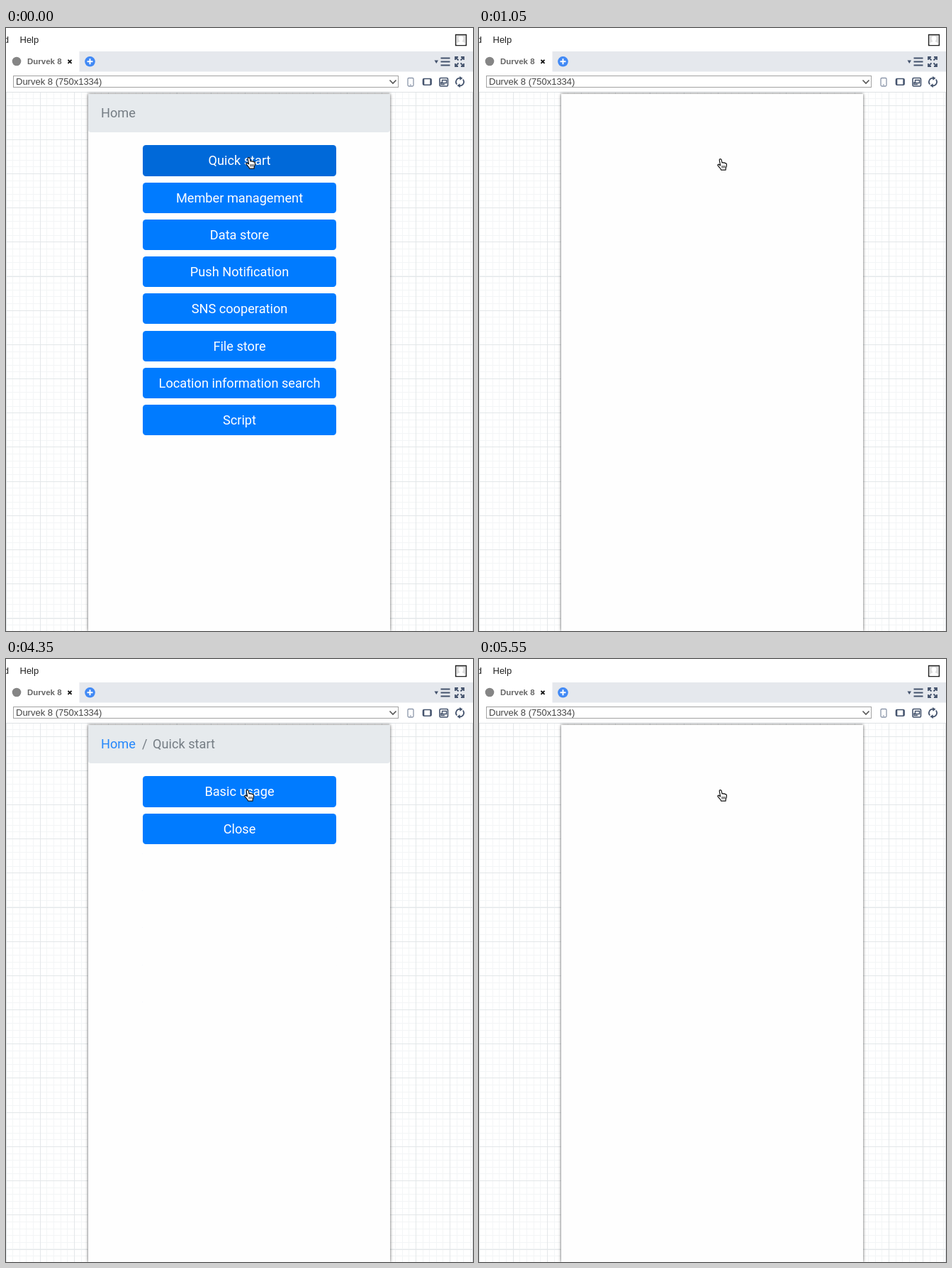
An HTML page that plays this animation: 659x850 px, repeating every 8000 ms.

```html
<!DOCTYPE html>
<html lang="en">
<head>
<meta charset="utf-8">
<title>Preview</title>
<style>
  html, body { margin: 0; width: 100%; height: 100%; overflow: hidden; background: #fff; }
  #stage { position: relative; width: 659px; height: 850px; overflow: hidden; }
  #stage > *, .page > * { position: absolute; }
  .ui { left: 0; top: 0; font: 13px "Liberation Sans", Arial, sans-serif; }

  .phone {
    left: 116px; top: 93px; width: 426px; height: 757px;
    background: #fefefe; box-shadow: 0 0 4px rgba(0, 0, 0, .65);
  }
  .page { left: 0; top: 0; width: 659px; height: 850px; font: 18.2px Roboto, sans-serif; visibility: hidden; }
  .crumbs {
    left: 116px; top: 93px; width: 408px; height: 54px; padding-left: 18px;
    line-height: 54px; border-radius: 0 0 4px 4px;
    background: #e6eaed; color: #757d84; white-space: pre;
  }
  .crumbs b { font-weight: 400; position: absolute; }
  .crumbs .link { color: #2487fb; }
  .btn {
    left: 193px; top: calc(165.4px + var(--row) * 52.22px); width: 273px; height: 43.2px;
    line-height: 43.6px; border-radius: 4.5px; text-align: center;
    background: #007bff; color: #fff;
  }
  .toast {
    left: 330px; top: 93px; width: 212px; height: 57.5px; line-height: 57px;
    border-radius: 0 0 0 5px; background: #1b2032; color: #fff; text-align: center;
    font-family: "Liberation Sans", Arial, sans-serif; font-size: 16.4px;
  }
  .status {
    left: -60px; top: 832px; width: 200px; height: 20px; padding-right: 7px;
    line-height: 19px; text-align: right; white-space: nowrap; color: #333;
    font: 12.8px/19px "Liberation Sans", Arial, sans-serif;
    background: #dee1e6; border-radius: 0 5px 0 0;
    box-shadow: 0 0 3px rgba(0, 0, 0, .6); visibility: hidden;
  }
  .cursor { left: 336px; top: 184px; }

  .home, .quick, .toast, .status, .cursor, .first, .second { animation: 8s step-end infinite; }
  .home { animation-name: home; }
  .quick { animation-name: quick; }
  .toast { animation-name: toast; visibility: hidden; }
  .status { animation-name: status; }
  .cursor { animation-name: cursor; }
  .first { animation-name: press-first; background: #0069d9; }
  .second { animation-name: press-second; }

  @keyframes home { 0% { visibility: visible } 13.125%, 100% { visibility: hidden } }
  @keyframes status { 0% { visibility: hidden } 18.75% { visibility: visible } 54.375%, 100% { visibility: hidden } }
  @keyframes quick { 0% { visibility: hidden } 54.375% { visibility: visible } 69.375%, 100% { visibility: hidden } }
  @keyframes toast { 0% { visibility: hidden } 63.75% { visibility: visible } 69.375%, 100% { visibility: hidden } }
  @keyframes cursor {
    0% { transform: translate(2px, -2px) }
    1.875% { transform: translate(1px, 0) }
    3.75%, 100% { transform: none }
  }
  @keyframes press-first {
    0% { box-shadow: none }
    5.625% { box-shadow: 0 0 0 1.6px rgba(38, 143, 255, .3) }
    7.5%, 100% { box-shadow: 0 0 0 3.6px rgba(38, 143, 255, .5) }
  }
  @keyframes press-second {
    0% { box-shadow: none; background: #007bff }
    65.625% { box-shadow: 0 0 0 1.6px rgba(38, 143, 255, .3); background: #0072ec }
    67.5%, 100% { box-shadow: 0 0 0 3.6px rgba(38, 143, 255, .5); background: #0069d9 }
  }
</style>
</head>
<body>
<div id="stage">
  <svg class="ui" width="659" height="850">
    <g shape-rendering="crispEdges" fill="none">
      <path id="minor" stroke="#f3f5f6"/>
      <path id="major" stroke="#e3e7e9"/>
    </g>
    <path d="M0 0H659V90H0Z" fill="#fff"/>
    <path d="M0 90.5H659M658.5 90V850" stroke="#dfe2e5"/>
    <path d="M103.500 33H659V61.500H103.500Z" fill="#e5e8ed"/>

    <text x="4" y="20.500" text-anchor="end" fill="#222">d</text>
    <text x="19.500" y="20.500" fill="#222">Help</text>
    <path d="M634.500 9.500h15v15h-15z" fill="#dcdcdc" stroke="#222" stroke-width="1.300"/>
    <path d="M636 24q0-4 4.500-5q-2-2-2-4.500q0-3 3.500-3t3.500 3q0 2.500-2 4.500q4.500 1 4.500 5z" fill="#fff"/>

    <circle cx="15" cy="47" r="6.300" fill="#858585"/>
    <text x="30" y="51" font-size="11.500" font-weight="700" fill="#666">Durvek 8</text>
    <path d="M87.500 44.800l5 5m0-5l-5 5" stroke="#111" stroke-width="1.900"/>
    <circle cx="118.500" cy="47.300" r="7.300" fill="#4189f5"/>
    <path d="M114.500 47.300h8m-4-4v8" stroke="#fff" stroke-width="2"/>

    <g fill="none" stroke="#44536d" stroke-width="1.800">
      <path d="M604.500 45.500h5.500l-2.750 4.500z" fill="#44536d" stroke="none"/>
      <path d="M613.500 42.500h13m-13 5h13m-13 5h13"/>
      <path d="M634 45v-4h4m4 0h4v4m0 5v4h-4m-4 0h-4v-4M634.500 41.500l4 4m7-4l-4 4m4 8l-4-4m-7 4l4-4"/>
      <rect x="567" y="70.500" width="8" height="11.500" rx="1.500" stroke="#8c97aa" stroke-width="1.300"/>
      <path d="M570 80h2" stroke="#8c97aa" stroke-width="1"/>
      <rect x="588.500" y="71.500" width="11.500" height="8.800" rx="1.500" stroke-width="1.600"/>
      <path d="M589.300 72v8M599.300 72v8" stroke-width="2"/>
      <rect x="612" y="70.500" width="11.500" height="11.500" rx="1.500" stroke-width="1.600"/>
      <path d="M615.500 73.500h6v4h-6zM614 76v3.500h5" stroke-width="1.400"/>
      <path d="M636.300 79.500a5.300 5.300 0 0 1 5-8.700M644.700 72.500a5.300 5.300 0 0 1-5 8.700"/>
      <path d="M640 68l4.500 2.800l-4 3zM641 84l-4.500-2.800l4-3z" fill="#44536d" stroke="none"/>
    </g>

    <rect x="10.500" y="67.500" width="543" height="16" fill="#fff" stroke="#a2a2a2"/>
    <text x="14" y="80" fill="#444">Durvek 8 (750x1334)</text>
    <path d="M541.500 73.500l4.500 4.500l4.500-4.500" fill="none" stroke="#555" stroke-width="1.600"/>
  </svg>

  <div class="phone"></div>

  <div class="page home" id="home">
    <div class="crumbs">Home</div>
  </div>

  <div class="page quick" id="quick">
    <div class="crumbs"><b class="link">Home</b><b style="left:76px">/</b><b style="left:91px">Quick start</b></div>
    <div class="toast">Browsersync: connected</div>
  </div>

  <div class="status">ate/quick-start/index.html</div>

  <svg class="cursor" width="16" height="18" fill="#fff" stroke="#111" stroke-width="1.200" stroke-linejoin="round">
    <path d="M3.200 2Q3.200.6 4.600.6Q5.800.6 6.200 2L7 6Q8.500 5 9.400 6.200Q10.800 5.400 11.500 6.800Q13.200 6.400 13.400 8Q13.800 11 12.400 13L12 16.200H5.600Q5.200 14.600 3.800 13.200L1 9.800Q.6 8.200 2.200 8.200L4.600 9.800Z"/>
    <path d="M7 10v3.500m2-3.500v3.500m2-3.500v3.500" stroke-width=".9"/>
  </svg>
</div>

<script>
  const addButtons = (page, labels, firstClass) => labels.forEach((label, row) => {
    const button = document.createElement('div');
    button.className = row ? 'btn' : 'btn ' + firstClass;
    button.style.setProperty('--row', row);
    button.textContent = label;
    document.getElementById(page).append(button);
  });
  addButtons('home', ['Quick start', 'Member management', 'Data store', 'Push Notification',
    'SNS cooperation', 'File store', 'Location information search', 'Script'], 'first');
  addButtons('quick', ['Basic usage', 'Close'], 'second');

  const gridLines = step => {
    let path = '';
    for (let p = 0; p < 850; p += step) {
      path += `M${Math.floor(p) + .5} 91V850M0 ${Math.floor(p + 60.8) + .5}H659`;
    }
    return path;
  };
  document.getElementById('minor').setAttribute('d', gridLines(9.64));
  document.getElementById('major').setAttribute('d', gridLines(48.2));
</script>
</body>
</html>
```
